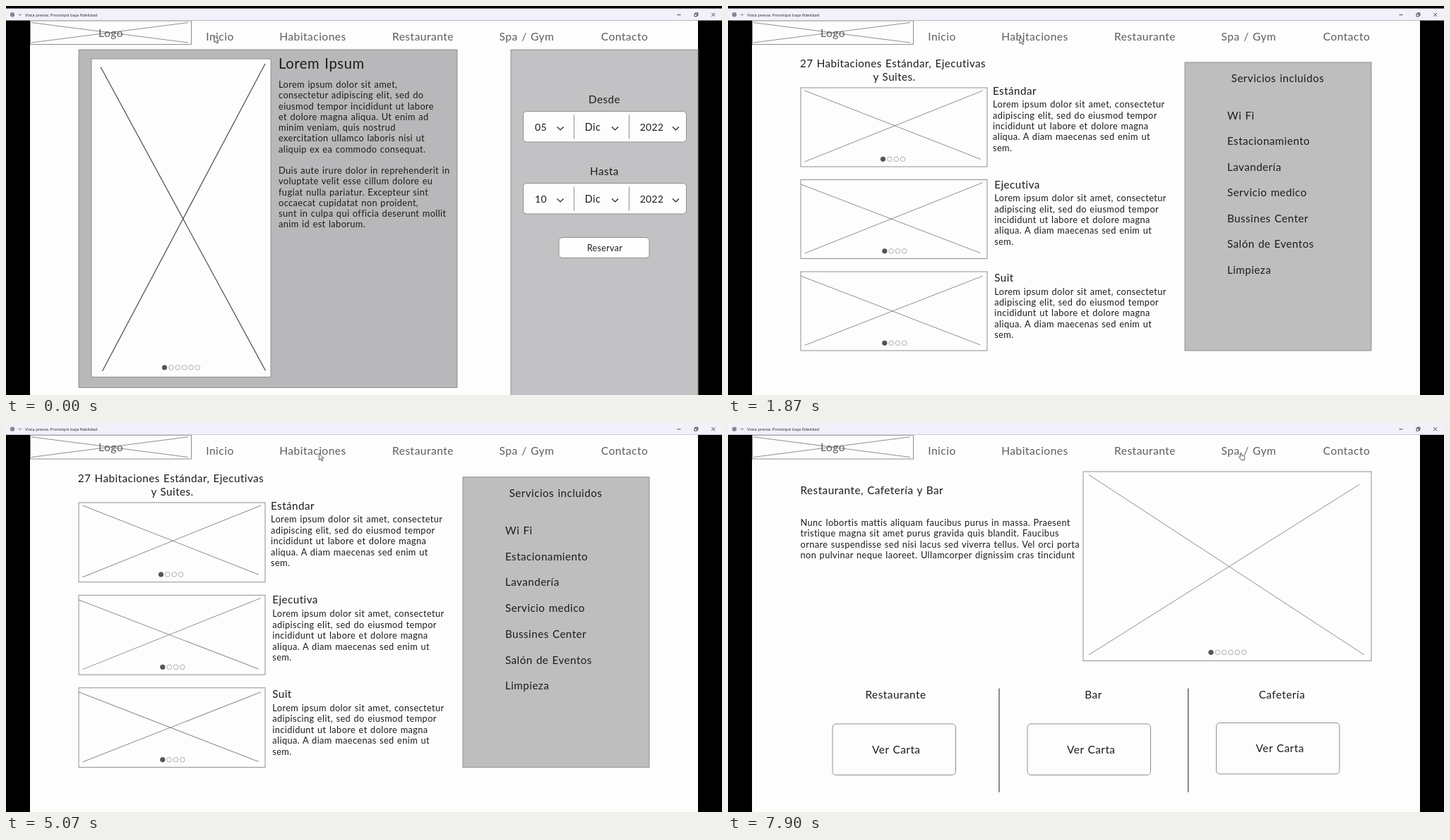
An HTML page that plays this animation: 1014 px wide and 552 px high, repeating every 8 s.

```html
<!DOCTYPE html>
<html lang="es">
<head>
<meta charset="utf-8">
<title>Vista previa</title>
<style>
  html, body { margin: 0; width: 100%; height: 100%; overflow: hidden; background: #000; }
  svg { display: block; width: 100vw; height: 100vh; }
  text { font-family: Lato, "Open Sans", sans-serif; letter-spacing: .03em; word-spacing: .06em; fill: #1c1c1c; }
  .nav text { fill: #5e5e5e; }
  .bar text { font-family: "Open Sans", "Noto Sans", sans-serif; letter-spacing: 0; word-spacing: 0; fill: #222; }
</style>
</head>
<body>
<svg id="stage" viewBox="0 0 1014 552" preserveAspectRatio="none"></svg>
<script>
const LOOP = 8000;
const RESIZE = 3630;
const ROOMS_AT = 1300;
const DINING_AT = 6600;
const PAGE = '#fdfdfd', LINE = '#8f8f8f', DARK = '#555';

const rect = (x, y, x2, y2, fill = 'none', stroke = LINE, r = 0) =>
  `<rect x="${x}" y="${y}" width="${x2 - x}" height="${y2 - y}" rx="${r}" fill="${fill}" stroke="${stroke}"/>`;
const path = (d, stroke = LINE, width = 1) =>
  `<path d="${d}" fill="none" stroke="${stroke}" stroke-width="${width}"/>`;
const text = (s, x, y, size = 15.2, anchor = 'start') =>
  `<text x="${x}" y="${y}" font-size="${size}" text-anchor="${anchor}">${s}</text>`;
const centred = (s, x, y, size) => text(s, x, y, size, 'middle');
const lines = (rows, x, y, step) =>
  rows.map((row, i) => row && text(row, x, y + i * step, 12.8)).join('');
const dots = (x, y, count) => Array.from({ length: count }, (_, i) =>
  `<circle cx="${x + i * 9.35}" cy="${y}" r="3.3" fill="${i ? PAGE : DARK}" stroke="${i ? '#999' : DARK}" stroke-width=".8"/>`).join('');
const group = (id, body, cls = '') => `<g id="${id}" class="${cls}">${body}</g>`;

function header() {
  const items = [['Inicio', 303], ['Habitaciones', 434.5], ['Restaurante', 590.5], ['Spa / Gym', 737.5], ['Contacto', 876]];
  return rect(34.5, 21, 262.5, 54.5) +
    path('M36 23.5L258 52M258 23.5L36 52') +
    centred('Logo', 148.5, 43.5, 15.6) +
    items.map(([s, x]) => centred(s, x, 48.7, 15.6)).join('');
}

function dateField(label, day, y) {
  const chevron = x => path(`M${x - 4.5} ${y + 22}l4.5 4.5l4.5 -4.5`, '#222', 1.2);
  return centred(label, 847.5, y - 12) +
    rect(732.5, y, 963.5, y + 43.5, PAGE, LINE, 5) +
    path(`M804.5 ${y + 5}v34M882.5 ${y + 5}v34`) +
    centred(day, 757.5, y + 27, 14) + centred('Dic', 831, y + 27, 14.4) + centred('2022', 914.5, y + 27, 13.8) +
    [785, 862.5, 948.5].map(chevron).join('');
}

function home() {
  return rect(103, 62, 639, 541.5, '#b8b8ba') +
    rect(121, 75, 375, 526.5, PAGE) +
    path('M134 86.5L367.5 517.5M367 82L136.5 518', DARK, 1.3) +
    dots(224.5, 513, 6) +
    text('Lorem Ipsum', 386, 89.3, 20.2) +
    lines(['Lorem ipsum dolor sit amet,', 'consectetur adipiscing elit, sed do',
      'eiusmod tempor incididunt ut labore', 'et dolore magna aliqua. Ut enim ad',
      'minim veniam, quis nostrud', 'exercitation ullamco laboris nisi ut',
      'aliquip ex ea commodo consequat.', '',
      'Duis aute irure dolor in reprehenderit in', 'voluptate velit esse cillum dolore eu',
      'fugiat nulla pariatur. Excepteur sint', 'occaecat cupidatat non proident,',
      'sunt in culpa qui officia deserunt mollit', 'anim id est laborum.'], 386, 116.2, 15.25) +
    rect(715, 62, 980, 560, '#c2c2c4') +
    dateField('Desde', '05', 149.5) + dateField('Hasta', '10', 251.5) +
    rect(783, 328.5, 911, 357.5, PAGE, LINE, 5) + centred('Reservar', 848, 348, 12.4);
}

function room(name, x, y, textY, slant) {
  const blurb = ['Lorem ipsum dolor sit amet, consectetur', 'adipiscing elit, sed do eiusmod tempor',
    'incididunt ut labore et dolore magna', 'aliqua. A diam maecenas sed enim ut', 'sem.'];
  return rect(103, y, 367, y + 112) + path(slant) +
    dots(x - 155.5, y + 101.3, 4) +
    text(name, x, textY) + lines(blurb, x, textY + 18.7, 15.35);
}

function rooms() {
  const services = ['Wi Fi', 'Estacionamiento', 'Lavandería', 'Servicio medico', 'Bussines Center', 'Salón de Eventos', 'Limpieza'];
  return centred('27 Habitaciones Estándar, Ejecutivas', 233.5, 87.3) + centred('y Suites.', 235.5, 105.7) +
    room('Estándar', 375, 116, 125.5, 'M108.5 120L358 217.5M361 120L108.5 221') +
    room('Ejecutiva', 377.3, 246.5, 258.5, 'M103 253L357.5 350.5M361 250.5L108.5 351') +
    room('Suit', 377.3, 377, 391, 'M103 383L357.5 481M361 383L108.5 481.5') +
    rect(647, 80, 911, 489, '#bebebe') +
    centred('Servicios incluidos', 778.5, 107.7) +
    services.map((s, i) => text(s, 707, 160.8 + i * 36.45)).join('');
}

function dining() {
  const option = (name, nameX, x, y) => centred(name, nameX, 391.3, 15.4) +
    rect(x, y, x + 174.5, y + 72.5, PAGE, LINE, 5) + centred('Ver Carta', x + 90.3, y + 41.7, 15.4);
  return text('Restaurante, Cafetería y Bar', 102.5, 101, 15.3) +
    lines(['Nunc lobortis mattis aliquam faucibus purus in massa. Praesent',
      'tristique magna sit amet purus gravida quis blandit. Faucibus',
      'ornare suspendisse sed nisi lacus sed viverra tellus. Vel orci porta',
      'non pulvinar neque laoreet. Ullamcorper dignissim cras tincidunt'], 102.5, 145.7, 15.4) +
    rect(503, 69, 911, 337.5) + path('M511 73.5L901 329M894.5 87L511 329') +
    dots(684, 325.5, 6) +
    path('M384 376.5V524M651.7 376.5V524', '#444', 1.2) +
    option('Restaurante', 237.5, 148, 427) + option('Bar', 517.5, 424, 427) + option('Cafetería', 784.5, 691.5, 425.5);
}

const titleBar = `<rect y="3.5" width="1014" height="17" fill="#f1f0fb"/>
  <circle cx="9" cy="12.3" r="3.2" fill="#888"/>` +
  path('M18 11.4l2 2l2 -2', '#444', .9) + text('Vista previa: Prototipó baja fidelidad', 27, 14.8, 6.1) +
  path('M950.5 12.5h5M975 11.2h3.6v3.6h-3.6zM976.3 11v-1.2h3.6v3.6h-1.2M999.2 9.8l5 5M1004.2 9.8l-5 5', '#333', .9);

const arrow = '<path d="M0 0V9.2L2.2 7.2L3.8 10.7L5.4 10L3.9 6.6H6.6Z" fill="#fff" stroke="#333" stroke-width=".8"/>';
const hand = '<path d="M1.5 .8Q2.5 -.4 3.3 .8V4L7 4.7Q8 5 7.8 6.5L7 10.5H3L-.3 6.4Q-.2 5 1.5 6Z" fill="#fff" stroke="#333" stroke-width=".8"/>';

const stage = document.getElementById('stage');
stage.innerHTML = `<rect width="1014" height="552"/>` +
  group('screen', `<rect x="34" y="20.5" width="946" height="540" fill="${PAGE}"/>` +
    group('header', header(), 'nav') + group('home', home()) + group('rooms', rooms())) +
  group('dining', dining()) + group('bar', titleBar, 'bar') +
  group('cursor', group('arrow', arrow) + group('hand', hand));

const el = id => document.getElementById(id);
const show = (id, on) => el(id).setAttribute('display', on ? 'inline' : 'none');
const place = (id, value) => el(id).setAttribute('transform', value);

// Cursor stops: time, x, y
const route = [[0, 295, 42.5], [150, 295, 42.5], [830, 412, 43.5], [1300, 412, 43.5], [1400, 413, 44],
  [1900, 413, 44], [2530, 560, 250], [3150, 673, 522], [3300, 673, 522],
  [3630, 560, 190], [4200, 429, 43.5], [4800, 429, 43.5], [6200, 575, 41], [6900, 576, 41],
  [7650, 724, 42], [LOOP, 724, 42]];

function cursorAt(t) {
  const i = route.findIndex(stop => stop[0] > t);
  const [t0, x0, y0] = route[i - 1], [t1, x1, y1] = route[i];
  const u = (t - t0) / (t1 - t0), e = u * u * (3 - 2 * u);
  return [x0 + (x1 - x0) * e, y0 + (y1 - y0) * e];
}

function render(t) {
  const resized = t >= RESIZE;
  place('screen', resized ? 'translate(0 552) scale(1 1.007) translate(0 -552)' : '');
  place('bar', resized ? 'translate(0 -3.7)' : '');
  show('home', t < ROOMS_AT);
  show('rooms', t >= ROOMS_AT && t < DINING_AT);
  show('dining', t >= DINING_AT);

  const pointing = (t >= 700 && t < ROOMS_AT) || (t >= 6350 && t < DINING_AT) || t >= 7870;
  show('hand', pointing);
  show('arrow', !pointing);
  show('cursor', t < 3300 || resized);
  place('cursor', `translate(${cursorAt(t).join(' ')})`);
}

const start = performance.now();
function tick() {
  render((performance.now() - start) % LOOP);
  requestAnimationFrame(tick);
}
tick();
</script>
</body>
</html>
```
